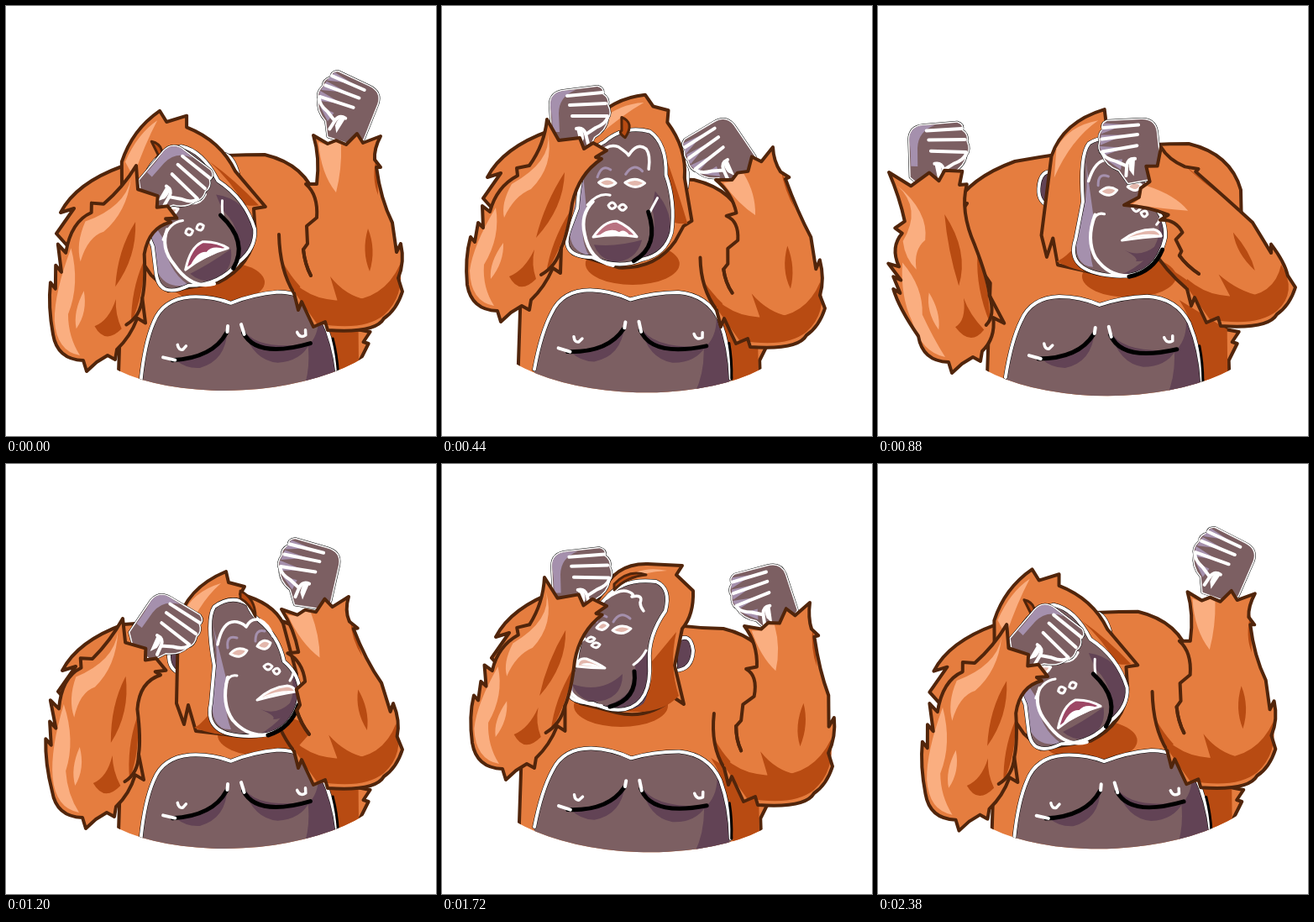
An HTML page with a canvas that plays this animation: 512x512 px, repeating every 2400 ms.

```html
<!DOCTYPE html>
<html lang="en">
<head>
<meta charset="utf-8">
<title>Dancing orangutan</title>
<style>
html, body { margin: 0; width: 100%; height: 100%; overflow: hidden; background: #fff; }
canvas { display: block; width: 512px; height: 512px; }
</style>
</head>
<body>
<canvas id="stage" width="512" height="512"></canvas>
<script>
const ctx = document.getElementById('stage').getContext('2d');
const LOOP = 2400, STEP = 20, RAD = Math.PI / 180;
const FUR = '#e57d3f', GLOW = '#faae80', SHADE = '#b84b12', LINE = '#51250b';
const SKIN = '#7c5f62', DUSK = '#624355', LILAC = '#a590ad', PINK = '#e3b7ac', WINE = '#9c4664';

// Periodic motion tracks: one row of values per key time.
const keys = [0, 440, 880, 1200, 1720, 2100];
const count = keys.length;
const wrap = k => (k + count) % count;
const keyTime = k => keys[wrap(k)] + LOOP * Math.floor(k / count);

const track = rows => t => {
  let i = count - 1;
  while (keys[i] > t) i--;
  const t0 = keyTime(i), span = keyTime(i + 1) - t0, u = (t - t0) / span;
  const u2 = u * u, u3 = u2 * u;
  return rows[0].map((_, c) => {
    const at = k => rows[wrap(k)][c];
    const slope = k => (at(k + 1) - at(k - 1)) / (keyTime(k + 1) - keyTime(k - 1)) * span;
    return (2 * u3 - 3 * u2 + 1) * at(i) + (3 * u2 - 2 * u3) * at(i + 1)
      + (u3 - 2 * u2 + u) * slope(i) + (u3 - u2) * slope(i + 1);
  });
};

const wave = (t, peak) => Math.cos((t - peak) / 1200 * 2 * Math.PI);

// Head: muzzle x, y, tilt, turn (-1 left, 1 right)
const headTrack = track([
  [238, 291, -17, 0], [210, 269, 8, -.2], [299, 284, 6, 1],
  [308, 285, 0, 1], [185, 250, 0, -1], [237, 285, 0, 0]]);
// Left tuft x, y and right shoulder x, y
const shoulderTrack = track([
  [63, 246, 308, 177], [52, 204, 300, 207], [88, 240, 370, 164],
  [65, 246, 318, 184], [62, 206, 335, 196], [95, 235, 345, 162]]);
// Arms: cuff left corner, cuff right corner, elbow offset
const leftArmTrack = track([
  [155, 190, 203, 253, 26, 59], [125, 135, 196, 172, 0, 0], [13, 198, 99, 196, 18, 61],
  [139, 184, 190, 246, 25, 58], [122, 135, 196, 169, 6, 0], [86, 182, 160, 210, 22, 63]]);
const rightArmTrack = track([
  [366, 154, 446, 155, 0, 0], [326, 207, 394, 168, -16, 20], [293, 237, 337, 168, 25, -5],
  [328, 173, 408, 158, 0, 0], [360, 193, 438, 165, -7, 20], [409, 142, 491, 145, 26, -6]]);
// Hands: x, y, angle
const leftHandTrack = track([
  [207, 205, 44], [165, 128, 0], [73, 170, 2], [195, 193, 38], [167, 132, 1], [147, 173, 25]]);
const rightHandTrack = track([
  [405, 115, 18], [325, 172, -38], [298, 165, -10], [359, 124, 9], [379, 154, -22], [469, 101, 27]]);

const fill = (d, color) => { ctx.fillStyle = color; ctx.fill(new Path2D(d)); };
const stroke = (d, color, width) => {
  ctx.strokeStyle = color;
  ctx.lineWidth = width;
  ctx.stroke(new Path2D(d));
};
const rim = (d, width = 4) => { stroke(d, '#000', width + 1); stroke(d, '#fff', width); };
const furry = d => { fill(d, FUR); stroke(d, LINE, 4); };
const placed = (x, y, angle, draw) => {
  ctx.save();
  ctx.translate(x, y);
  ctx.rotate(angle * RAD);
  draw();
  ctx.restore();
};

function drawBody(t) {
  const [lx, ly, rx, ry] = shoulderTrack(t);
  const [hx, hy, , turn] = headTrack(t);
  const cx = 249 + 25 * wave(t, 1060), cy = 352.7 + 3.5 * wave(t, 960);
  const tilt = 2.8 * wave(t, 600) - .4;

  ctx.save();
  const clip = new Path2D();
  clip.rect(0, 0, 512, 400);
  clip.ellipse(cx + 10, cy + 22.5 + 1.5 * tilt, 190, 86, tilt * RAD, 0, 2 * Math.PI);
  ctx.clip(clip);

  furry(`M${cx - 135},480 L${cx - 130},330 L${lx + 15},${ly + 45} L${lx - 3},${ly + 25}
    L${lx + 18},${ly - 5} L${lx + 2},${ly} Q${lx + 20},${ly - 35} ${lx + 75},${ly - 55}
    Q${rx - 90},${ry} ${rx},${ry} Q${rx + 50},${ry + 12} ${rx + 62},${ry + 55}
    L${cx + 170},300 L${cx + 150},385 L${cx + 166},388 L${cx + 158},400 L${cx + 164},402
    L${cx + 154},422 L${cx + 156},480 Z`);
  fill(`M${cx + 95},350 Q${cx + 122},390 ${cx + 122},480 L${cx + 153},480 L${cx + 152},385 Z`, SHADE);

  ctx.fillStyle = SHADE;
  ctx.beginPath();
  ctx.ellipse(hx + 14 - 14 * turn, hy + 38, 56, 25, 0, 0, 2 * Math.PI);
  ctx.fill();

  placed(cx, cy, tilt, () => {
    ctx.translate(-263, -356);
    const chest = `M151,442 Q158,398 170,374 Q182,347 215,346 Q240,346 263,356
      Q290,347 320,346 Q355,348 370,378 Q383,410 385,447`;
    fill(chest + ' L385,480 L151,480 Z', SKIN);
    fill('M366,372 Q382,405 385,480 L335,480 Q354,450 352,412 Q368,398 366,372 Z', DUSK);
    fill('M194,420 Q238,420 257,388 Q254,424 222,431 Q205,431 194,420 Z', DUSK);
    fill('M276,388 Q290,414 354,410 Q342,430 315,430 Q286,426 276,388 Z', DUSK);
    rim(chest);
    stroke('M382,405 Q386,425 386,447', '#000', 3);
    stroke('M190,420 Q238,420 256,391 M276,392 Q290,424 355,409', '#000', 5);
    stroke('M179,416 L193,420 M257,390 L258,383 M274,382 L277,394', '#fff', 4);
    stroke('M197,402 Q198,409 203,408 L207,404 M340,395 Q343,403 350,399 L350,393', '#fff', 3.5);
  });
  ctx.restore();
}

// Each head part is drawn for three views: left, front, right.
const head = {
  ear: [
    'M278,212 Q296,198 299,222 Q298,245 278,246 Z M190,200 Q185,200 185,215 Q188,225 190,225 Z',
    'M286,180 Q302,182 300,212 Q297,222 286,222 Z M180,210 Q172,210 173,230 Q175,245 180,245 Z',
    'M300,210 Q310,210 312,225 Q310,235 300,235 Z M212,209 Q193,205 194,230 Q195,248 212,250 Z'],
  hair: [
    `M190,155 Q205,118 245,119 L286,121 L279,132 L299,151 Q300,180 286,196 L277,240 L288,286
     L276,278 Q245,305 208,296 L165,285 L155,262 L156,240 L165,195 Z`,
    `M172,155 Q195,122 233,110 L237,125 L262,125 L258,138 Q292,165 298,205 L320,256 L306,254
     L300,280 Q285,318 240,326 L180,318 L166,294 L156,262 L160,195 Z`,
    `M205,190 Q214,148 262,128 L265,141 L284,146 L279,155 Q318,165 330,190 L346,250 L345,260
     L340,285 Q310,322 270,323 L226,318 L217,287 L212,310 L203,285 Z`],
  hairGlow: [
    'M213,140 Q235,120 268,127 Q240,128 213,140 Z',
    'M176,156 Q200,128 227,120 Q205,142 180,176 Z',
    'M210,180 Q222,152 256,142 Q226,168 211,215 Z'],
  hairShade: [
    'M279,200 Q270,240 282,276 Q260,300 215,294 Q255,280 250,235 Z',
    'M272,185 Q295,215 313,252 Q300,250 296,245 Q290,215 272,185 Z',
    'M224,314 Q260,328 300,321 Q255,322 240,300 Q230,312 224,314 Z'],
  face: [
    `M160,235 Q165,190 195,160 Q215,135 255,140 Q273,148 266,175 Q245,205 247,235
     Q250,285 218,292 Q200,295 180,285 Q145,285 150,262 Z`,
    `M178,262 Q170,190 195,178 Q215,155 245,158 Q268,170 275,210 Q300,240 300,278
     Q295,300 270,310 Q240,330 205,319 Q165,325 173,290 Z`,
    `M248,240 Q238,185 248,170 Q268,155 288,167 Q292,178 300,185 Q325,205 331,235
     Q349,250 350,272 Q344,324 292,324 Q235,325 244,285 Z`],
  cheek: [
    'M160,235 Q150,250 150,262 Q150,280 160,282 Q154,272 156,255 Z',
    'M178,205 Q176,250 174,290 Q177,316 205,318 Q186,295 192,255 Z',
    'M246,190 Q256,235 245,275 Q243,318 268,316 Q258,290 262,255 Z'],
  shadow: [
    'M244,220 Q250,270 240,285 Q225,298 195,288 Q235,275 230,240 Z',
    'M268,225 Q300,240 300,278 Q295,305 262,312 Q290,280 270,245 Z',
    'M340,245 Q352,262 348,287 Q338,320 300,323 Q338,302 342,270 Z'],
  chin: [
    'M155,262 Q190,274 215,250 Q215,282 180,283 Q162,280 155,262 Z',
    'M211,306 Q236,302 266,292 Q262,318 235,323 Q218,318 211,306 Z',
    'M303,292 Q322,300 339,284 Q336,304 318,304 Q322,300 303,292 Z'],
  curl: [
    'M205,143 Q222,125 243,132 Q220,134 205,150 Z',
    'M213,142 Q230,152 213,174 Q207,168 216,160 Z',
    'M279,151 Q297,160 297,182 Q290,166 279,160 Z'],
  brow: [
    'M196,160 Q212,148 222,152 Q230,155 226,158 Q240,155 236,165 Q236,170 240,175',
    'M192,197 Q195,182 210,184 Q222,190 226,193 Q232,172 248,178 Q256,185 255,205',
    'M252,215 Q258,185 275,188 Q283,190 286,194 Q292,182 303,186 Q312,190 318,205'],
  lid: [
    'M184,188 Q188,177 196,182 M204,188 Q212,174 224,184',
    'M195,224 Q198,206 210,212 M231,214 Q238,198 250,207',
    'M264,219 Q262,203 275,207 M297,211 Q297,196 308,199'],
  eyes: [
    'M184,195 Q192,184 198,192 Q192,201 184,195 Z M203,198 Q213,189 225,196 Q215,206 203,198 Z',
    'M198,230 Q208,220 220,228 Q210,238 198,230 Z M232,224 Q243,214 256,221 Q246,232 232,224 Z',
    'M267,226 Q275,216 287,222 Q280,234 267,226 Z M299,217 Q306,206 315,213 Q311,225 299,217 Z'],
  nose: [
    'M172,210 Q177,203 182,208 Q178,214 172,210 Z M178,216 Q183,210 188,215 Q184,222 178,216 Z',
    'M220,258 Q224,250 229,258 Q224,266 220,258 Z M234,257 Q238,249 243,256 Q239,264 234,257 Z',
    'M307,241 Q312,235 317,241 Q312,249 307,241 Z M318,246 Q324,240 326,247 Q322,254 318,246 Z'],
  crease: [
    'M160,225 Q162,212 170,208 M228,239 Q238,232 243,222',
    'M192,258 Q205,240 221,243 M268,254 Q269,245 273,234',
    'M262,262 Q265,250 275,252 M338,258 Q341,254 342,249'],
  muzzle: [
    'M158,240 Q150,255 151,268 Q160,285 190,288',
    'M200,248 Q186,266 196,290 Q207,325 235,326',
    'M264,254 Q256,285 270,305 Q290,328 318,321'],
  jaw: [
    'M229,247 Q233,280 200,289',
    'M266,250 Q289,290 262,315',
    'M312,323 Q340,314 348,287'],
  mouth: [
    'M161,241 Q162,230 172,232 Q185,237 194,243 Q178,243 161,241 Z',
    'M207,300 Q220,276 236,274 Q252,278 263,290 Q235,289 207,300 Z',
    'M299,281 Q315,266 335,264 Q343,265 345,271 Q325,274 299,281 Z'],
  teeth: [
    'M165,239 Q173,234 190,242 Q178,241 165,239 Z',
    'M214,297 Q227,283 237,287 Q246,281 259,290 Q235,289 214,297 Z',
    'M304,278 Q322,269 342,270 Q325,273 304,278 Z']
};
const pivots = ['185,250', '237,285', '308,285'];
const NUMBER = /\d+(\.\d+)?/g;

function blendViews(views, turn) {
  const side = views[turn < 0 ? 0 : 2].match(NUMBER), k = Math.abs(turn);
  let i = 0;
  return views[1].replace(NUMBER, n => (+n + (side[i++] - n) * k).toFixed(2));
}

function drawHead(t) {
  const [x, y, tilt, rawTurn] = headTrack(t);
  const turn = Math.max(-1, Math.min(1, rawTurn));
  const view = {};
  for (const part in head) view[part] = blendViews(head[part], turn);
  const [px, py] = blendViews(pivots, turn).split(',');

  placed(x, y, tilt, () => {
    ctx.translate(-px, -py);
    fill(view.ear, DUSK);
    rim(view.ear);
    furry(view.hair);
    fill(view.hairGlow, GLOW);
    fill(view.hairShade, SHADE);
    fill(view.face, SKIN);
    fill(view.cheek, LILAC);
    fill(view.shadow, DUSK);
    fill(view.chin, DUSK);
    rim(view.face);
    stroke(view.brow, '#fff', 3.5);
    stroke(view.lid, LILAC, 3);
    fill(view.eyes, PINK);
    stroke(view.eyes, '#fff', 3);
    stroke(view.nose, '#fff', 3);
    stroke(view.crease, '#fff', 3);
    stroke(view.muzzle, '#fff', 4);
    stroke(view.jaw, '#000', 5);
    fill(view.mouth, WINE);
    ctx.globalAlpha = Math.min(1, Math.abs(turn) * 2);
    fill(view.mouth, PINK);
    ctx.globalAlpha = 1;
    fill(view.teeth, '#fff');
    stroke(view.mouth, '#fff', 3);
    fill(view.curl, SHADE);
    stroke(view.curl, LINE, 3);
  });
}

function drawHand([x, y, angle], mirrored) {
  placed(x, y, angle, () => {
    if (mirrored) ctx.scale(-1, 1);
    const fist = `M-33,35 L-36,-10 Q-36,-25 -20,-27 L20,-32 Q28,-30 26,-23 Q34,-18 32,-10
      Q37,0 32,6 Q30,20 16,28 L8,45 L-20,45 Z`;
    rim(fist, 3);
    fill(fist, SKIN);
    if (mirrored) {
      fill('M24,-30 L0,-24 L30,-18 Z M30,-17 L2,-12 L33,-5 Z M34,-4 L4,3 L32,8 Z M28,14 L10,16 L14,28 Z', LILAC);
    } else {
      fill('M-34,5 L-36,-10 Q-36,-25 -20,-27 L-6,-28 Q-26,-20 -26,0 L-25,22 L-33,22 Z', LILAC);
    }
    stroke('M-16,-21 L26,-25 M-13,-10 L30,-12 M-10,3 L32,3', '#fff', 4);
    stroke('M-5,18 Q3,16 6,24 L9,36 M6,25 L18,17 Q30,12 32,5', '#fff', 4);
    fill('M-5,18 Q4,16 4,30 L0,38 Z', '#fff');
  });
}

// Slides a path between elbow and cuff; the cuff's turn and scale fade out down the arm.
function bend(d, rest, [ax, ay, bx, by, ex, ey]) {
  const [rx, ry, sx, sy] = rest;
  const ux = sx - rx, uy = sy - ry, vx = bx - ax, vy = by - ay, q = ux * ux + uy * uy;
  const cos = (ux * vx + uy * vy) / q - 1, sin = (ux * vy - uy * vx) / q;
  const cx = (rx + sx) / 2, cy = (ry + sy) / 2;
  const mx = (ax + bx) / 2 - cx, my = (ay + by) / 2 - cy;
  return d.replace(/([\d.]+),([\d.]+)/g, (_, a, b) => {
    const x = +a, y = +b, dx = x - cx, dy = y - cy;
    const k = Math.max(0, Math.min(1, (330 - y) / 160)), twist = k * k;
    const px = x + ex + (mx - ex) * k + (dx * cos - dy * sin) * twist;
    const py = y + ey + (my - ey) * k + (dx * sin + dy * cos) * twist;
    return px.toFixed(2) + ',' + py.toFixed(2);
  });
}

const leftArm = {
  rest: [125, 135, 196, 172],
  outline: `M125,135 L139,160 L164,157 L169,170 L180,163 L196,172 L183,180 L190,182 Q163,200 155,235
    Q150,270 142,288 L141,318 L132,312 Q122,335 106,350 L104,362 L95,357 L82,365 L70,376 L66,363
    Q35,362 30,332 Q27,300 34,275 L39,281 L43,258 L49,264 L48,238 L57,245 Q65,215 90,202
    L89,193 L104,190 Q122,165 125,135 Z`,
  glow: `M126,152 Q131,185 83,212 Q70,235 74,252 Q86,226 106,218 Q134,190 126,152 Z
    M64,240 Q37,285 33,315 Q34,352 62,357 Q48,335 50,308 Q70,275 64,240 Z
    M73,282 Q56,305 58,325 Q74,305 73,282 Z`,
  shade: `M146,198 Q122,235 112,276 Q145,240 146,198 Z
    M110,290 Q98,315 80,322 Q92,345 112,325 Q106,308 110,290 Z
    M152,245 Q147,280 124,318 Q130,280 152,245 Z`,
  fold: 'M142,288 Q136,310 118,320'
};
const rightArm = {
  rest: [366, 154, 446, 155],
  outline: `M343,342 L348,362 L352,352 L366,382 L380,376 L383,386 Q440,390 450,372
    Q465,362 472,340 L467,324 Q475,305 470,283 L465,293 L460,258 Q446,230 441,192 L446,192 L439,183
    Q438,170 446,155 L425,163 L418,152 L405,165 L393,160 L383,164 L366,154 Q374,180 370,212
    L357,212 Q372,225 370,252 L358,262 L359,283 L354,290 Q356,308 363,321`,
  glow: 'M372,162 L383,166 L393,162 L399,165 Q400,195 393,222 Q375,200 372,162 Z',
  shade: `M343,330 Q362,346 382,349 Q445,360 469,308 Q475,345 450,368 Q425,388 370,378 L343,340 Z
    M431,265 Q423,292 433,316 Q441,290 431,265 Z M386,322 Q404,345 430,350 L395,352 Z
    M441,180 Q435,205 443,225 Z`,
  fold: 'M354,290 Q356,308 363,321',
  armpit: 'M325,272 Q326,315 343,342',
  armpitShade: 'M327,300 Q330,325 343,342 L366,348 Q342,330 327,300 Z'
};

function drawArmpit(t) {
  const bent = name => bend(rightArm[name], rightArm.rest, rightArmTrack(t));
  fill(bent('armpitShade'), SHADE);
  stroke(bent('armpit'), LINE, 4);
}

function drawArm(arm, pose) {
  const bent = name => bend(arm[name], arm.rest, pose);
  fill(bent('outline'), FUR);
  fill(bent('glow'), GLOW);
  fill(bent('shade'), SHADE);
  stroke(bent('outline'), LINE, 4);
  stroke(bent('fold'), LINE, 4);
}

function frame(now) {
  const t = Math.floor(now % LOOP / STEP) * STEP;
  ctx.fillStyle = '#fff';
  ctx.fillRect(0, 0, 512, 512);
  ctx.lineJoin = ctx.lineCap = 'round';
  drawBody(t);
  drawArmpit(t);
  drawHead(t);
  drawHand(leftHandTrack(t), false);
  drawArm(leftArm, leftArmTrack(t));
  drawHand(rightHandTrack(t), true);
  drawArm(rightArm, rightArmTrack(t));
}

let start;
function tick() {
  const now = performance.now();
  start ??= now;
  frame(now - start);
  requestAnimationFrame(tick);
}
tick();
</script>
</body>
</html>
```
